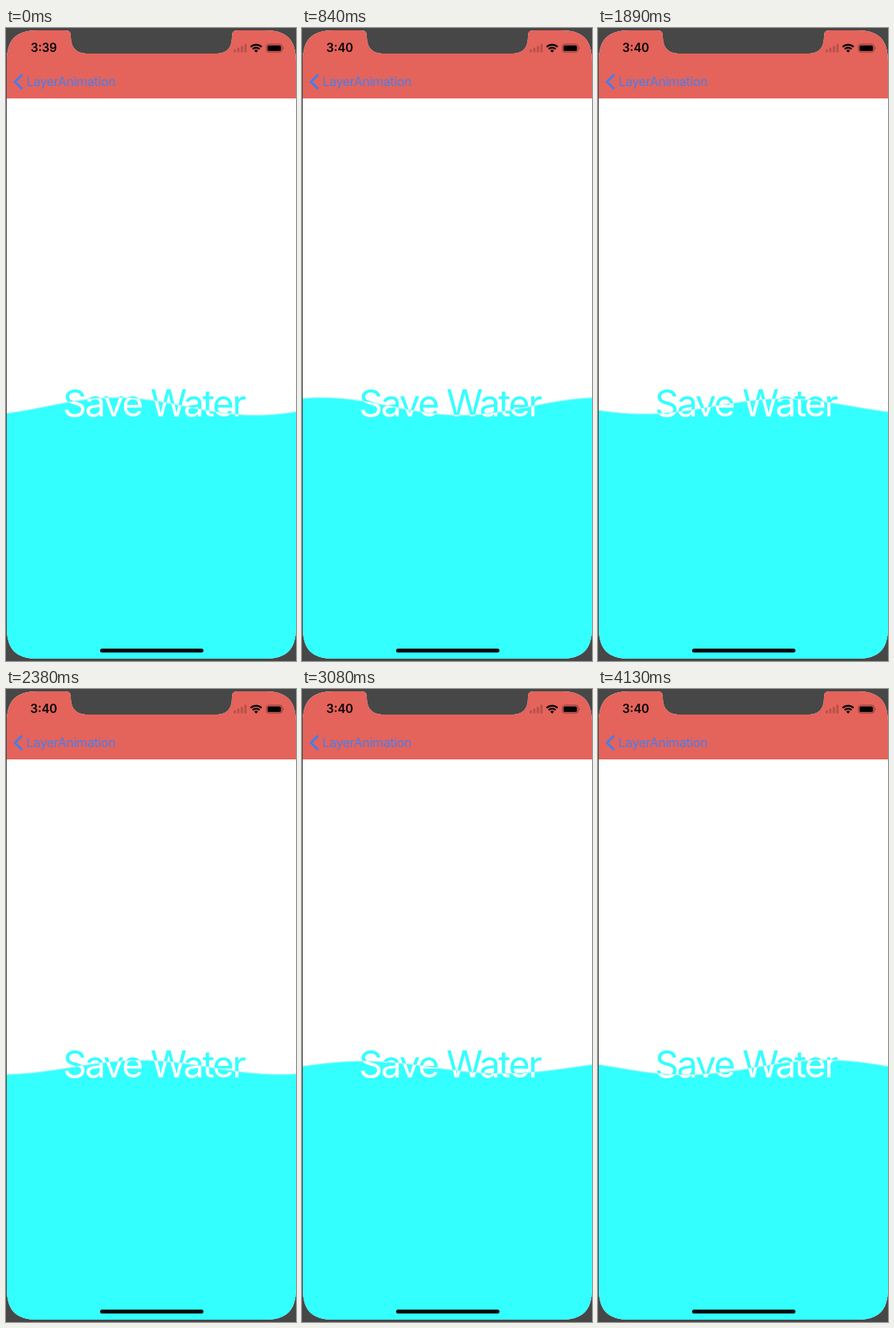
An HTML page for the animation above (4.2 s loop, 376x818 px).

```html
<!DOCTYPE html>
<html lang="en">
<head>
<meta charset="utf-8">
<title>Save Water</title>
<style>
  html, body { margin: 0; width: 100%; height: 100%; overflow: hidden; background: #474747; }
  svg { display: block; width: 376px; height: 818px; }
  text { font-family: Inter, Roboto, "Liberation Sans", sans-serif; }
  .label { font-size: 48px; letter-spacing: -2.2px; text-anchor: middle; }
</style>
</head>
<body>
<svg viewBox="0 0 376 818">
  <defs>
    <clipPath id="screen">
      <path d="M1 43C1 15 13 3 41 3H77Q84 3 84 10C84 26 91 33 107 33H271C287 33 293 26 293 10Q293 3 300 3H336C364 3 376 15 376 43V775C376 803 364 815 336 815H41C13 815 1 803 1 775Z"/>
    </clipPath>
    <clipPath id="water"><path id="waterClip"/></clipPath>
  </defs>
  <rect width="376" height="818" fill="#474747"/>
  <g clip-path="url(#screen)">
    <rect width="376" height="818" fill="#fff"/>
    <text class="label" x="191.5" y="502" fill="#33ffff">Save Water</text>
    <path id="waterBody" fill="#33ffff"/>
    <path id="crest" fill="none" stroke="#a8f4f6" stroke-width="1.6" stroke-opacity=".7"/>
    <text class="label" x="191.5" y="502" fill="#fff" clip-path="url(#water)">Save Water</text>
    <rect width="376" height="91" fill="#e4635b"/>
  </g>

  <text id="clock" x="49" y="31.3" font-size="15.3" font-weight="600" text-anchor="middle">3:39</text>
  <path d="M21 60.3 11.5 69.5 21 78.7" fill="none" stroke="#3c7ff5" stroke-width="2.8"/>
  <text x="26.5" y="75.3" font-size="16.5" letter-spacing="-.35" fill="#4a7deb">LayerAnimation</text>

  <g fill="#b9514b">
    <rect x="295" y="27.5" width="3" height="4" rx=".8"/>
    <rect x="299.7" y="25.5" width="3" height="6" rx=".8"/>
    <rect x="304.4" y="23" width="3" height="8.5" rx=".8"/>
    <rect x="309" y="20.5" width="3" height="11" rx=".8"/>
  </g>
  <g fill="none" stroke="#000" stroke-width="2.2">
    <path d="M317.2 24.5A10.2 10.2 0 0 1 331.4 24.5"/>
    <path d="M319.8 27.2A6.4 6.4 0 0 1 328.8 27.2"/>
  </g>
  <path d="M324.3 31.8 321.9 29.3A3.4 3.4 0 0 1 326.7 29.3Z"/>
  <rect x="337.5" y="20.9" width="20.5" height="10.4" rx="3" fill="none" stroke="#8b403b"/>
  <rect x="339" y="22.4" width="17.5" height="7.4" rx="1.6"/>
  <path d="M359 24.3Q361 26.1 359 27.9Z" fill="#8b403b"/>
  <rect x="122" y="802" width="134" height="5" rx="2.5"/>
</svg>
<script>
  const LOOP = 4200, FRAME = 70, MINUTE_CHANGE = 280;
  const LEVEL = 489, WAVELENGTH = 361;
  const byId = id => document.getElementById(id);
  const [clock, body, clip, crest] = ['clock', 'waterBody', 'waterClip', 'crest'].map(byId);

  // Swell rises and falls linearly between 8 and 12 px, 50 ticks each way.
  const swell = tick => 8 + 0.08 * Math.abs(50 - Math.abs(tick - 8));

  function surface(tick) {
    const peak = 142.5 - 7.31 * tick;
    const height = swell(tick);
    const points = [];
    for (let x = 0; x <= 376; x += 2) {
      const y = LEVEL - height * Math.cos(2 * Math.PI * (x - peak) / WAVELENGTH);
      points.push(`${x} ${y.toFixed(2)}`);
    }
    return 'M' + points.join('L');
  }

  function render(time) {
    const frame = Math.floor((time % LOOP) / FRAME);
    const line = surface(Math.floor(frame * 4 / 3 + 0.2));
    const area = line + 'V818H0Z';
    body.setAttribute('d', area);
    clip.setAttribute('d', area);
    crest.setAttribute('d', line);
    clock.textContent = frame * FRAME < MINUTE_CHANGE ? '3:39' : '3:40';
  }

  const start = performance.now();
  function loop(now) {
    render(Math.max(0, now - start));
    requestAnimationFrame(loop);
  }
  render(0);
  requestAnimationFrame(loop);
</script>
</body>
</html>
```
